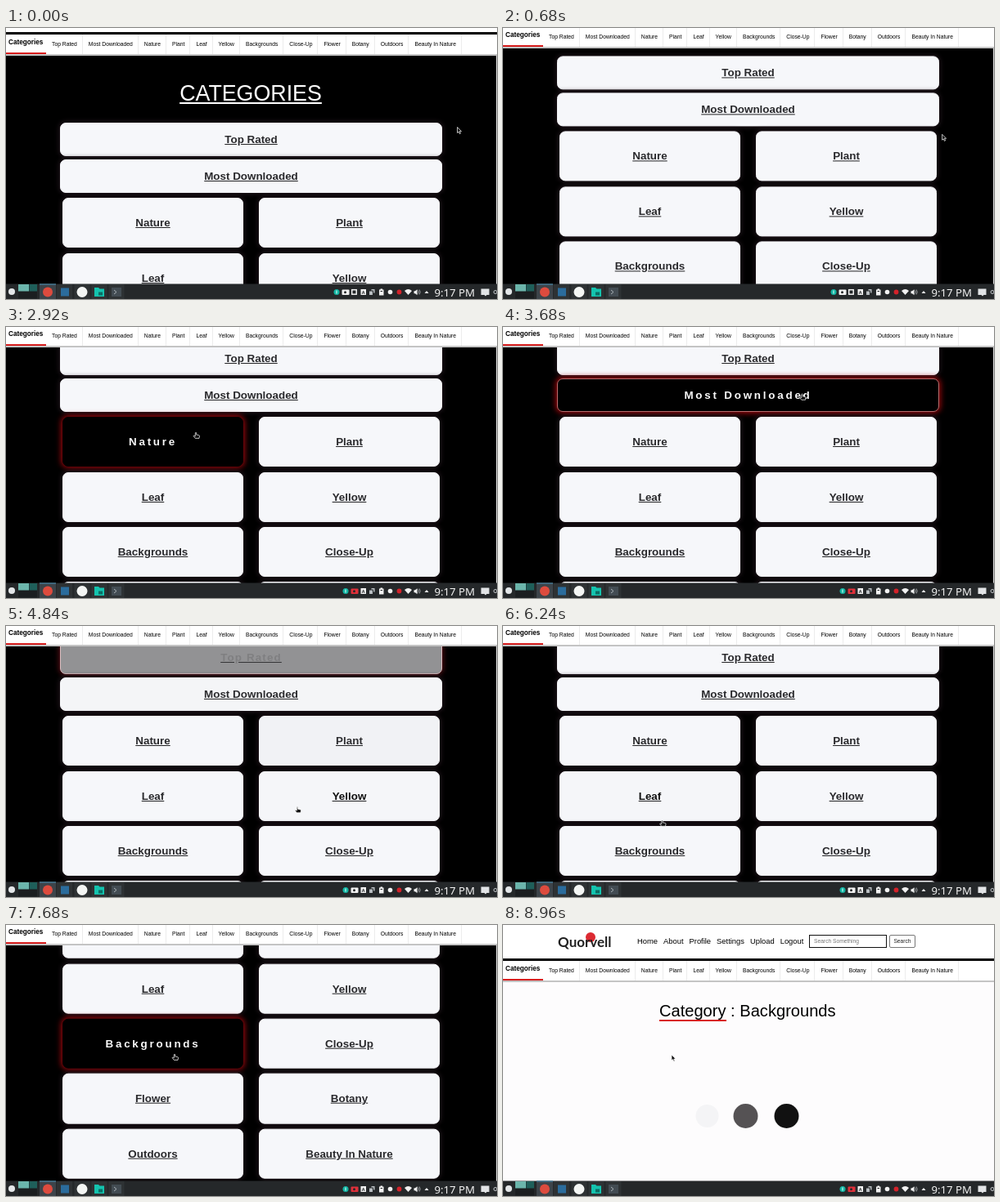
Recreate the animation shown at these times as an HTML page. Size 600 by 332 pixels, loop 9000 ms.

```html
<!DOCTYPE html>
<html lang="en">
<head>
<meta charset="utf-8">
<title>Categories</title>
<style>
html, body { margin: 0; width: 100%; height: 100%; overflow: hidden; }
body { font-family: "Liberation Sans", Arial, sans-serif; }
#stage { position: absolute; left: 0; top: 0; width: 600px; height: 332px; overflow: hidden; background: #000; }
#stage div, svg { position: absolute; white-space: nowrap; }
#list, #detail, #head { left: 0; top: 0; width: 600px; }
#detail { height: 332px; background: #fdfcfd; }
#stage #edge { left: 599px; top: 0; width: 1px; height: 332px; background: #d8d8d8; }
.title { left: 0; width: 598px; top: 96px; line-height: 40px; text-align: center; font-size: 26.8px; color: #fff; text-decoration: underline; }
.card { box-sizing: border-box; border: .8px solid transparent; border-radius: 7px; display: flex; align-items: center; justify-content: center; font-weight: bold; font-size: 13.4px; }
.card span { text-decoration: underline; text-decoration-color: #222; }
#head { height: 41px; background: #fff; border-bottom: 3px solid #000; }
#menu { left: 164px; top: 10px; line-height: 20px; font-size: 9.4px; display: flex; gap: 7px; color: #000; }
#brand { left: 67px; top: 9px; font: bold 17px/24px Lato, sans-serif; color: #222; }
#disc { left: 101px; top: 9px; width: 12px; height: 12px; border-radius: 50%; background: #dc2a32; }
#field { left: 374px; top: 11.5px; width: 88px; height: 14px; padding-left: 5px; border: 1.5px solid #111; font-size: 6.7px; line-height: 14px; color: #757575; }
#button { left: 472px; top: 11.5px; width: 30px; height: 14.5px; border: 1px solid #777; border-radius: 2px; font-size: 6.7px; line-height: 14.5px; text-align: center; color: #222; }
#nav { left: 0; top: 0; width: 600px; height: 24px; background: #fff; border-bottom: 2px solid #c4c4c4; display: flex; font-size: 6.75px; line-height: 23px; color: #000; }
#nav span { padding: 0 7px; box-shadow: inset -.7px 0 #e4e4e4; }
#nav b { box-sizing: border-box; width: 49px; padding-left: 3px; font-size: 8.2px; line-height: 19px; height: 23.5px; border-bottom: 2.2px solid #d81e1e; }
#heading { left: 191px; top: 90px; font-size: 20.1px; line-height: 30px; color: #000; }
#heading i { position: absolute; left: 0; top: 26px; width: 82px; height: 2.2px; background: #d81e1e; }
svg { left: 0; top: 0; overflow: visible; }
</style>
</head>
<body>
<div id="stage">
  <div id="list"><div class="title">CATEGORIES</div></div>
  <div id="edge"></div>
  <div id="detail">
    <div id="heading">Category : Backgrounds<i></i></div>
    <svg width="600" height="332">
      <circle class="dot" cx="249.5" cy="234" r="14" fill="#f4f4f6"/>
      <circle class="dot" cx="296.5" cy="234" r="15" fill="#555254"/>
      <circle class="dot" cx="346.5" cy="234" r="15" fill="#111"/>
    </svg>
  </div>
  <div id="head">
    <div id="disc"></div><div id="brand">Quorvell</div>
    <div id="menu"></div>
    <div id="field">Search Something</div><div id="button">Search</div>
  </div>
  <div id="nav"><b>Categories</b></div>
  <svg width="600" height="332" font-family="Noto Sans, sans-serif">
    <rect y="313.5" width="600" height="18.5" fill="#25282a"/>
    <circle cx="7" cy="323" r="4" fill="#e4e7e9"/>
    <rect x="15" y="314" width="23" height="17.5" fill="#1b1e20"/>
    <rect x="15" y="314" width="13" height="8.5" fill="#6bb5ab"/>
    <rect x="28.5" y="314" width="9.5" height="8.5" fill="#1f5f5a"/>
    <path d="M62 314h19v18h-19zM83.500 314h19v18h-19zM104.500 314h19v18h-19zM125.500 314h19v18h-19z" fill="#2e3234"/>
    <rect x="41" y="313.5" width="20" height="18.5" fill="#3d444a"/>
    <rect x="41" y="313.5" width="20" height="1" fill="#4a8fb5"/>
    <circle cx="51" cy="323.5" r="6" fill="#dd4b3e"/>
    <rect x="67" y="318.5" width="10" height="10" fill="#2b6c9c"/>
    <circle cx="93" cy="323.5" r="6.5" fill="#f4f6f4"/>
    <path d="M108 318h5l1.5 1.5h5.5v9.5h-12z" fill="#14c3ae"/>
    <rect x="113" y="323.5" width="5" height="4" fill="#0b6e66"/>
    <rect x="129" y="318" width="12" height="11" fill="#434c53"/>
    <path d="M132 321l3 2.5-3 2.5" fill="none" stroke="#aab2b8"/>
    <g id="tray">
      <circle r="3.5" cy="323.5" fill="#12b5a3"/>
      <rect x="-.5" y="321.5" width="1" height="4" fill="#e9fffb"/>
      <g id="cam"><rect x="6.5" y="320.5" width="9" height="6.5" rx="1"/><circle cx="10.5" cy="323.7" r="1.5" fill="#25282a"/></g>
    </g>
    <rect id="stop" x="422.7" y="320.7" width="5.5" height="5.5" fill="none" stroke="#f2f2f2" stroke-width="1.5"/>
    <g fill="#f2f2f2">
      <rect x="433.5" y="320" width="6.5" height="7"/>
      <text x="434.7" y="325.7" font-size="5.5" font-weight="bold" fill="#25282a">A</text>
      <path d="M444 322.5h4v4.5h-4zM446.5 320h4v4.5h-1.5v-3h-2.5z" fill="#b9bec2"/>
      <path d="M456 320.5h1.5v-1h2.5v1h1.5v7H456z"/>
      <rect x="457.5" y="322" width="2.5" height="1" fill="#25282a"/>
      <circle cx="469.5" cy="323.5" r="2.8"/>
      <circle cx="480.5" cy="323.5" r="2.9" fill="#d3222a"/>
      <path d="M487 322q4.5-4 9 0l-4.5 5z"/>
      <path d="M498.5 322.2h1.5l2.5-2v7l-2.5-2h-1.5z"/>
      <path d="M503.5 321.5q1.8 2 0 4M505 320.5q2.5 3 0 6" fill="none" stroke="#c9cdd0" stroke-width=".7"/>
      <path d="M511.5 325l2.5-3 2.5 3z"/>
      <text x="523.5" y="328.5" font-size="13.2">9:17 PM</text>
      <path d="M580.5 319.5h10v7.5h-3l-1.5 1.5-1.5-1.5h-4z" fill="#e2e4e6"/>
      <circle cx="598" cy="323.5" r="2" fill="none" stroke="#c9cdd0"/>
    </g>
    <g id="cursor" stroke="#fff" stroke-width=".7" fill="#111" stroke-linejoin="round">
      <path id="arrow" d="M0 0v7l1.6-1.4 1.2 2.6 1.2-.6-1.2-2.5h2.2z"/>
      <path id="hand" d="M-.7.5q.7-1 1.4 0v2.3l3 .6q.9.3.8 1.3l-.5 2.600H-.7L-2.8 4.6q0-1 1-.6l1.1.7z"/>
    </g>
  </svg>
</div>
<script>
const LOOP = 9000, FADE = 500, SWITCH = 8320;
const $ = id => document.getElementById(id);
const names = ["Top Rated", "Most Downloaded", "Nature", "Plant", "Leaf", "Yellow",
  "Backgrounds", "Close-Up", "Flower", "Botany", "Outdoors", "Beauty In Nature"];

// Hover spans per card: [start, end] in ms
const hovers = {
  "Top Rated": [[3900, 4635]],
  "Most Downloaded": [[3000, 3880], [4640, 4652]],
  "Nature": [[1350, 1590], [1992, 2960]],
  "Plant": [[930, 1310], [1620, 1992], [4800, 4812]],
  "Yellow": [[4838, 5150]],
  "Leaf": [[5190, 5560], [6238, 6630]],
  "Backgrounds": [[7100, SWITCH]]
};

// Pointer stops: time, x, y
const stops = [[0, 551.5, 121.5], [450, 551.5, 121.5], [930, 520, 140], [1280, 400, 140],
  [1400, 240, 140], [1560, 250, 140], [1680, 400, 142], [1930, 390, 142], [2080, 174, 134],
  [2500, 180, 145], [2900, 230, 130], [3150, 330, 85], [3680, 365.5, 82], [3950, 350, 45],
  [4600, 350, 50], [4840, 356, 221.5], [5100, 370, 215], [5250, 220, 215], [5480, 190, 215],
  [5620, 190, 242], [6200, 195, 241.5], [6240, 194.5, 238], [6550, 150, 215],
  [6700, 40, 190], [7000, 60, 165], [7200, 206, 158], [LOOP, 206, 159]];

const clamp = v => Math.min(1, Math.max(0, v));
const smooth = v => { v = clamp(v); return v * v * (3 - 2 * v); };
const ease = ms => smooth(Math.pow(clamp(ms / FADE), .65));
const mix = (a, b, k) => a + (b - a) * k;
const rgb = (a, b, k) => `rgb(${a.map((v, i) => Math.round(mix(v, b[i], k)))})`;
const PAPER = [246, 247, 250];

function add(parent, tag, text, cls) {
  const el = document.createElement(tag);
  el.textContent = text;
  if (cls) el.className = cls;
  return parent.appendChild(el);
}

["Home", "About", "Profile", "Settings", "Upload", "Logout"].forEach(s => add($("menu"), "span", s));
names.forEach(s => add($("nav"), "span", s));

const cards = names.map((name, i) => {
  const el = add($("list"), "div", "", "card"), wide = i < 2;
  const row = (i - 2) >> 1;
  const [x, y, w, h] = wide ? [66, 151.7 + i * 44.8, 467, 41.7]
    : [i % 2 ? 309 : 69, 244.1 + row * 67.4, 221, 61.3];
  Object.assign(el.style, { left: x + "px", top: y + "px", width: w + "px", height: h + "px" });
  return { el, wide, label: add(el, "span", name), spans: hovers[name] || [] };
});

const inside = (spans, t) => spans.some(([a, b]) => t >= a && t < b);

function heat(spans, t) {
  return Math.max(0, ...spans.map(([a, b]) =>
    t < a ? 0 : t < b ? ease(t - a) : ease(b - a) * (1 - ease(t - b))));
}

function paintCard(card, t) {
  const k = heat(card.spans, t);
  const s = card.el.style, l = card.label.style;
  const fresh = inside(card.spans, t) && k < .06;
  const fill = rgb(PAPER, [0, 0, 0], k);
  s.background = fill;
  s.borderColor = card.wide ? rgb(PAPER, [185, 110, 110], k) : fill;
  s.boxShadow = `0 0 ${mix(6, 7, k)}px ${mix(1, 1.5, k)}px ${rgb([36, 24, 31], [165, 8, 14], k)}`;
  l.color = fresh ? "#111" : rgb([42, 42, 45], [250, 250, 250], k);
  l.textDecorationColor = `rgba(34,34,36,${1 - k * k})`;
  l.letterSpacing = 2.77 * k + "px";
}

function pointer(t) {
  let i = 0;
  while (i < stops.length - 2 && t >= stops[i + 1][0]) i++;
  const a = stops[i], b = stops[i + 1], k = smooth((t - a[0]) / (b[0] - a[0]));
  return [mix(a[1], b[1], k), mix(a[2], b[2], k)];
}

const dots = [...document.querySelectorAll(".dot")].map(el => ({ el, r: +el.getAttribute("r") }));

function draw(t) {
  const loaded = t >= SWITCH;
  const scroll = loaded ? 0 : 36 + 98 * smooth(t / 920) + 130.3 * smooth((t - 6560) / 460);
  const move = (id, y) => $(id).style.transform = `translateY(${y}px)`;
  move("list", -scroll);
  move("head", -scroll);
  move("nav", Math.max(44 - scroll, -1));
  $("list").style.display = loaded ? "none" : "";
  $("detail").style.display = loaded ? "" : "none";
  cards.forEach(c => paintCard(c, t));
  dots.forEach(d => d.el.setAttribute("r", d.r * (.95 + .05 * Math.cos((t - 8960) / 140))));

  const early = t < 1000, phase = t % 2000;
  const red = !early && (phase < 200 || phase >= 900);
  $("tray").setAttribute("transform", `translate(${early ? 404 : 415} 0)`);
  $("cam").setAttribute("fill", red ? "#e0303a" : "#f2f2f2");
  $("stop").style.display = early ? "" : "none";

  const over = cards.some(c => inside(c.spans, t));
  $("hand").style.display = over ? "" : "none";
  $("arrow").style.display = over ? "none" : "";
  $("cursor").setAttribute("transform", `translate(${pointer(t)})`);
}

const start = performance.now();
function tick() {
  draw((performance.now() - start) % LOOP);
  requestAnimationFrame(tick);
}
draw(0);
requestAnimationFrame(tick);
</script>
</body>
</html>
```
